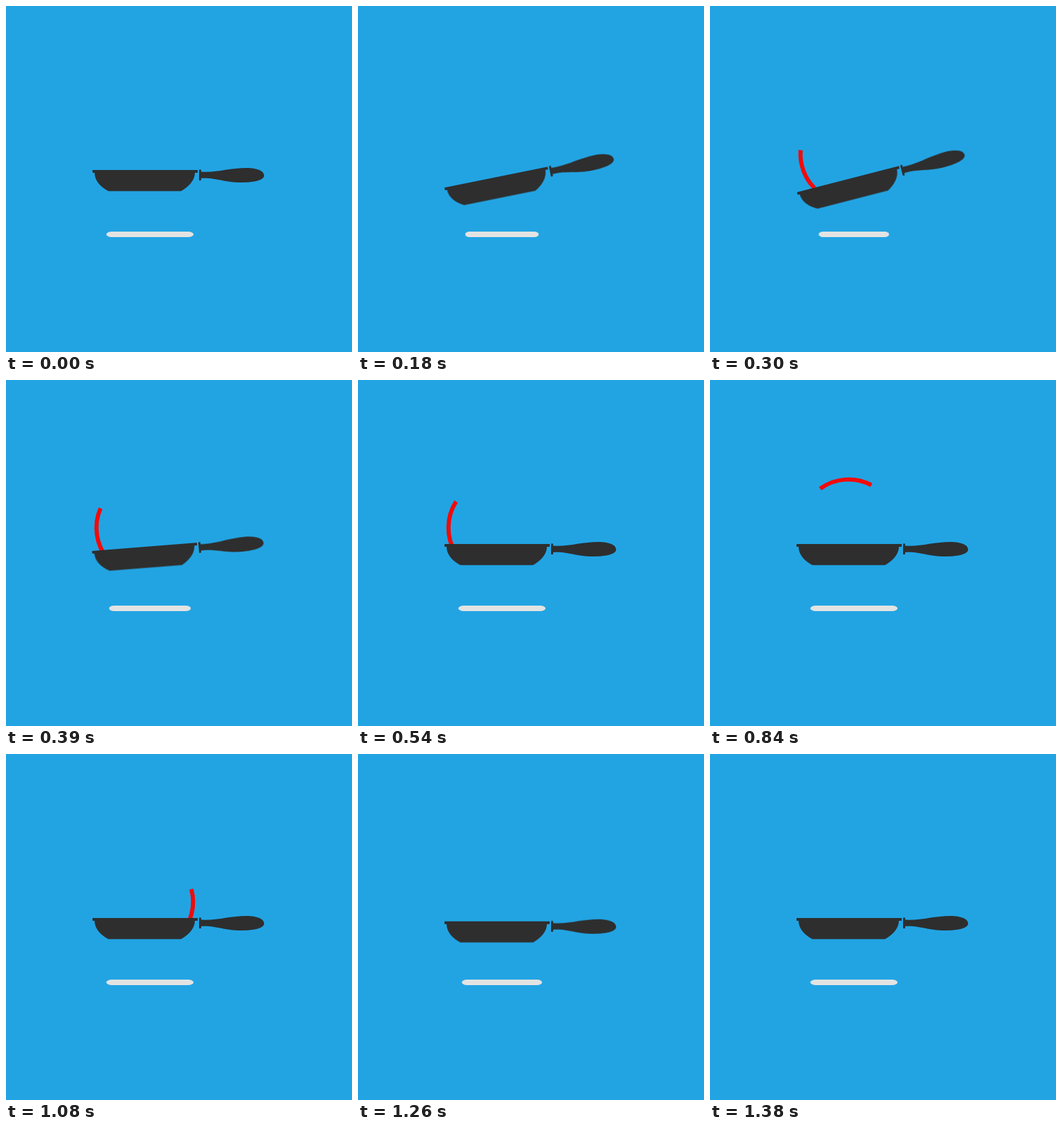
Animation of 500x500 px, one loop 1.65 s. Source, as an HTML page:

```html
<!DOCTYPE html>
<html lang="en">
<head>
<meta charset="utf-8">
<title>Pan flip loader</title>
<style>
  :root {
    --quad-in: cubic-bezier(.333, 0, .667, .333);
    --quad-out: cubic-bezier(.333, .667, .667, 1);
    --cubic-out: cubic-bezier(.333, 1, .667, 1);
    --quad-in-out: cubic-bezier(.455, .03, .515, .955);
  }
  html, body {
    margin: 0;
    width: 100%;
    height: 100%;
    overflow: hidden;
    background: #22a4e3;
  }
  svg { display: block; width: 100%; height: 100%; }

  .pan, .shadow, .toss { animation: 1650ms linear infinite; }
  .pan { fill: #2e2e2e; transform-origin: 252px 250px; animation-name: pan; }
  .shadow { fill: #e3e3e3; transform-origin: 208px 330px; animation-name: shadow; }
  .toss {
    fill: none;
    stroke: #f20a0a;
    stroke-width: 6;
    stroke-dasharray: 64 999;
    animation-name: toss;
  }

  /* tilt back, flick level, then dip on the catch */
  @keyframes pan {
    0%, 5.45% { transform: translateY(0) rotate(0deg); animation-timing-function: var(--cubic-out); }
    17.4% { transform: translateY(0) rotate(-15deg); animation-timing-function: var(--quad-in-out); }
    32.7% { transform: translateY(0) rotate(0deg); }
    69.7% { transform: translateY(0) rotate(0deg); animation-timing-function: var(--quad-in-out); }
    76.7% { transform: translateY(4.8px) rotate(0deg); animation-timing-function: var(--quad-in-out); }
    83.64%, 100% { transform: translateY(0) rotate(0deg); }
  }
  @keyframes shadow {
    0%, 5.45% { transform: scaleX(1); animation-timing-function: var(--cubic-out); }
    17.4% { transform: scaleX(.8); animation-timing-function: var(--quad-in-out); }
    32.7% { transform: scaleX(1); }
    69.7% { transform: scaleX(1); animation-timing-function: var(--quad-in-out); }
    76.7% { transform: scaleX(.92); animation-timing-function: var(--quad-in-out); }
    83.64%, 100% { transform: scaleX(1); }
  }
  /* offsets are degrees along the arc; it slows at the top */
  @keyframes toss {
    0%, 8.42% { stroke-dashoffset: 75.6; animation-timing-function: var(--quad-in); }
    33% { stroke-dashoffset: -13.7; animation-timing-function: var(--quad-out); }
    57.58% { stroke-dashoffset: -103; animation-timing-function: var(--quad-in); }
    80.3%, 100% { stroke-dashoffset: -280; }
  }
</style>
</head>
<body>
<svg viewBox="0 0 500 500">
  <rect class="shadow" x="145" y="326" width="126" height="8" rx="8" ry="4"/>
  <path class="toss" pathLength="270" d="M151 263A70 70 0 1 1 250 263"/>
  <g class="pan">
    <path d="M125 237H277V241H273C273 252 264 261 253 267.5H148C136 261 128 252 128 241H125Z"/>
    <path d="M279 236.5H282V239.5C306 241 322 234 348 234C362 234 373 238 373 245C373 252 357 255 340 255C314 255 302 247.500 282 249V252H279Z"/>
  </g>
</svg>
</body>
</html>
```
